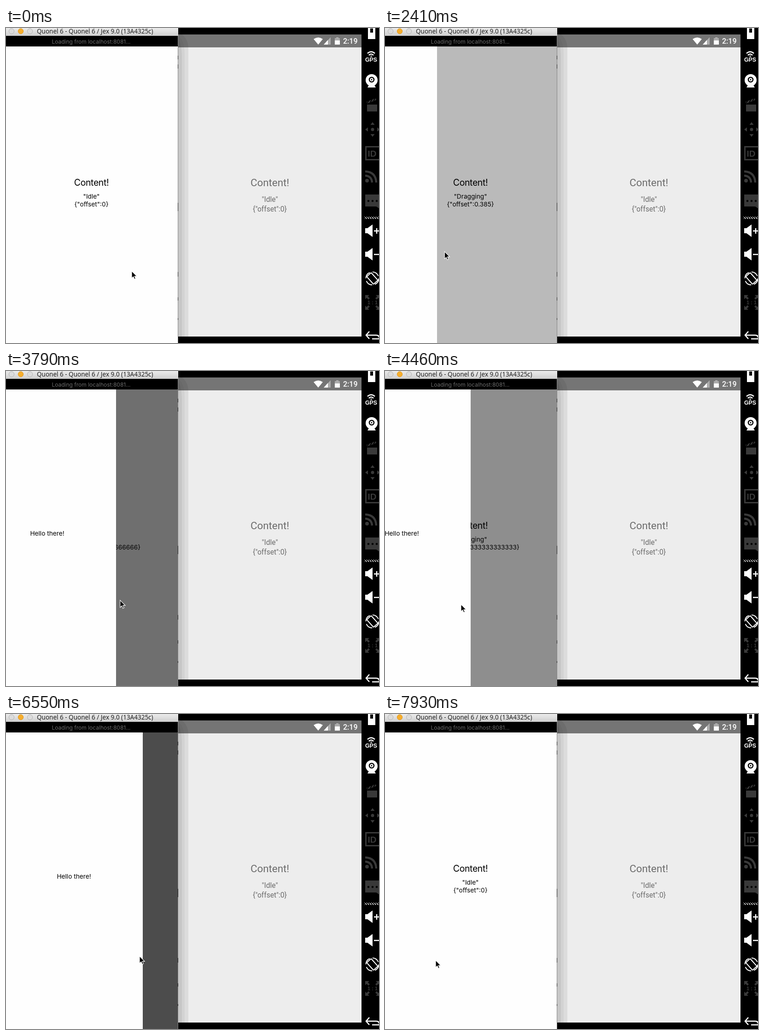
An HTML page for the animation above (7990 ms loop, 810 by 683 pixels).

```html
<!DOCTYPE html>
<html lang="en">
<head>
<meta charset="utf-8">
<title>Drawer layout</title>
<style>
  html, body { margin: 0; width: 100%; height: 100%; overflow: hidden; background: #000; }
  svg { display: block; width: 810px; height: 683px; }
  .mid { text-anchor: middle; }
  .phone { font: 13.7px Inter, sans-serif; }
  .phone .title { font-size: 19.5px; letter-spacing: -.02em; }
  .android { font: 15.6px Roboto, sans-serif; fill: #6c6c6c; }
  .android .title { font-size: 22.3px; }
  .bold { font-family: "Liberation Sans", sans-serif; font-weight: bold; }
  .line { fill: none; stroke: #fff; stroke-width: 2.5; }
  .dim { fill: #393939; }
  .dimline { fill: none; stroke: #393939; stroke-width: 3; }
</style>
</head>
<body>
<svg viewBox="0 0 810 683">
  <defs>
    <linearGradient id="bar" x2="0" y2="1">
      <stop stop-color="#ebebeb"/><stop offset="1" stop-color="#cfcfcf"/>
    </linearGradient>
    <pattern id="hatch" width="5" height="5" patternUnits="userSpaceOnUse">
      <path d="M0 0l4 5" stroke="#ddd" stroke-width="1.6"/>
    </pattern>
    <path id="speaker" d="M780-6h5l11-8v27l-11-8h-5z" fill="#fff"/>
    <path id="tip" d="M-4.5-10l4.500-6 4.500 6z"/>
    <path id="corner" d="M-16-16h9l-3 3 4 4-3 3-4-4-3 3z"/>
  </defs>
  <rect width="810" height="683"/>

  <!-- Right-hand device -->
  <rect x="374" y="14" width="398" height="655" fill="#ededed"/>
  <rect x="374" y="14" width="398" height="28" fill="#757575"/>
  <path d="M374 14h8q14 10 14 32v623h-22z" opacity=".07"/>
  <path d="M374 18q14 8 14 40v611h-14z" opacity=".04"/>
  <path d="M374 24q8 10 8 40v605h-8z" opacity=".06"/>
  <g fill="#fff">
    <path d="M668 24q10-7 20 0l-10 12z"/>
    <path d="M705 20v16h-15zM714 22h3v-2h5v2h3v6h-11z" opacity=".4"/>
    <path d="M699 26v10h-9zM714 27h11v9h-11z"/>
    <text x="732" y="34" font-family="Roboto, sans-serif" font-size="16" font-weight="500">2:19</text>
  </g>
  <g class="android mid">
    <text class="title" x="573" y="343">Content!</text>
    <text x="573" y="377">"Idle"</text>
    <text x="573" y="398">{"offset":0}</text>
  </g>

  <!-- Emulator toolbar -->
  <path d="M786 0h16v24h-16z" fill="#fff"/><path d="M791 1h6v9h-6z"/>
  <path class="line" d="M785 55q8-7 16 0M788 59q5-5 10 0"/>
  <circle cx="793" cy="61" r="1.5" fill="#fff"/>
  <text class="mid bold" x="793" y="73" fill="#fff" font-size="12.3">GPS</text>
  <circle cx="794" cy="113" r="13" fill="#fff"/>
  <circle cx="794" cy="112" r="5" fill="none" stroke="#000" stroke-width="2.5"/>
  <circle cx="794" cy="112" r="1.5"/>
  <path d="M788 124h12l3 5h-18z" fill="#fff"/>
  <g class="dim">
    <path d="M784 166h22v15h-22zM783 160l20-8 1 4-20 8z"/>
    <text class="mid bold" x="795" y="279" font-size="19">ID</text>
    <circle cx="784" cy="331" r="4"/>
    <path d="M780 361h30v30l-6-4h-24z"/>
    <text class="mid bold" x="796" y="599" font-size="11">1 : 1</text>
    <g transform="translate(796 220)">
      <circle r="3.5"/>
      <use href="#tip"/><use href="#tip" transform="rotate(90)"/>
      <use href="#tip" transform="rotate(180)"/><use href="#tip" transform="rotate(270)"/>
    </g>
    <g transform="translate(796 595)">
      <use href="#corner"/><use href="#corner" transform="rotate(90)"/>
      <use href="#corner" transform="rotate(180)"/><use href="#corner" transform="rotate(270)"/>
    </g>
  </g>
  <rect class="dimline" x="781.5" y="257.5" width="31" height="28"/>
  <path class="dimline" style="stroke-width:4.5" d="M780 320q14 1 15 15M780 311q23 1 24 24"/>
  <path d="M784 163l4-6M791 161l4-6M798 158l4-6" stroke="#000" stroke-width="2"/>
  <path d="M787 375h19" stroke="#000" stroke-width="4.500" stroke-linecap="round" stroke-dasharray="0 9"/>
  <rect x="778" y="409" width="32" height="5" fill="url(#hatch)"/>
  <use href="#speaker" y="440"/><use href="#speaker" y="491"/>
  <path class="line" d="M799 440h11M805 434v12M799 491h11"/>
  <g class="line" style="stroke-width:2">
    <rect x="789" y="532" width="13" height="22" rx="2" transform="rotate(-42 795.5 543)"/>
    <circle cx="795.5" cy="543" r="14" stroke-dasharray="16 6"/>
  </g>
  <path class="line" d="M789 658l-7 8 7 8M782 666h22q7 0 7 8h-16"/>

  <!-- Left-hand device -->
  <g class="phone">
    <rect id="page" y="40" width="373" height="643"/>
    <g class="mid">
      <text class="title" x="185.5" y="342">Content!</text>
      <text id="state" x="185.5" y="370"></text>
      <text id="offset" x="185.5" y="387"></text>
    </g>
    <g id="drawer">
      <rect x="-300" y="40" width="300" height="643" fill="#fefefe"/>
      <text class="mid" x="-149.5" y="356.5">Hello there!</text>
    </g>
  </g>
  <rect y="17" width="373" height="23"/>
  <text class="mid" x="185" y="33.5" fill="#6b6b6b" font-family="Inter, sans-serif" font-size="12">Loading from localhost:8081...</text>
  <rect width="374" height="17" fill="url(#bar)"/>
  <g fill="#dcdcdc" stroke="#b4b4b4">
    <circle cx="12" cy="7" r="5.7"/>
    <circle cx="32" cy="7" r="5.7" fill="#f6ae2d" stroke="#dc9a28"/>
    <circle cx="52" cy="7" r="5.7"/>
  </g>
  <text x="67" y="12" fill="#222" font-family="Noto Sans, sans-serif" font-size="13.5">Quonel 6 - Quonel 6 / Jex 9.0 (13A4325c)</text>
  <path d="M373.5 17v666" stroke="#858585"/>
  <path d="M373.5 60v8m0 11v9m0 291v18m0 132v10m0 45v7m0 38v4" stroke="#222"/>

  <path id="cursor" d="M0 0v15.500l3.600-3.300 2.400 5.400 2.500-1.100-2.400-5.200h5z" stroke="#fff" stroke-width="1.1"/>
</svg>
<script>
const LOOP = 7990, TICK = 10, DRAWER = 300, SCALE = 373 / 375;

// Smooth curve through [time, value] turning points, without overshoot.
function curve(...keys) {
  const slope = i => keys[i] && keys[i + 1]
    ? (keys[i + 1][1] - keys[i][1]) / (keys[i + 1][0] - keys[i][0]) : 0;
  const tangent = i => {
    const a = slope(i - 1), b = slope(i);
    return a * b > 0 ? 2 * a * b / (a + b) : 0;
  };
  return t => {
    const i = keys.findLastIndex(key => key[0] <= t);
    if (i < 0) return keys[0][1];
    if (i === keys.length - 1) return keys[i][1];
    const [t0, v0] = keys[i], [t1, v1] = keys[i + 1];
    const u = (t - t0) / (t1 - t0);
    return v0 + (v1 - v0) * u * u * (3 - 2 * u)
      + (t1 - t0) * u * (1 - u) * (tangent(i) * (1 - u) - tangent(i + 1) * u);
  };
}

const pointerX = curve([230, 273], [930, 8], [1290, 8], [1630, 73], [2580, 132], [2970, 132],
  [3230, 142], [3900, 255], [4460, 165], [5380, 14], [5650, 199], [5910, 290], [6730, 290],
  [7280, 138], [7930, 110]);
const pointerY = curve([230, 527], [930, 476], [1630, 480], [3230, 491], [4460, 506],
  [5650, 524], [7280, 526], [7930, 534]);
const pull = curve([1290, 0], [1630, 47.5], [2580, 119], [2970, 119], [3230, 127.5], [3900, 250],
  [4460, 188.5], [4650, 0], [5400, 0], [5650, 136.5], [5910, 300], [7100, 300],
  [7280, 226.5], [7480, 0]);

const $ = id => document.getElementById(id);
const move = (id, x, y) => $(id).setAttribute('transform', `translate(${x} ${y})`);

function draw(now) {
  const t = Math.floor(now % LOOP / TICK) * TICK;
  const points = Math.round(pull(t) * 2) / 2;
  const open = points / DRAWER;
  const released = Math.abs(pull(t) - pull(t - TICK)) / TICK > 0.9;
  const state = open === 0 || open === 1 ? 'Idle' : released ? 'Settling' : 'Dragging';
  const shade = 254 * (1 - 0.7 * open);

  $('page').setAttribute('fill', `rgb(${shade},${shade},${shade})`);
  $('state').textContent = JSON.stringify(state);
  $('offset').textContent = JSON.stringify({ offset: open });
  move('drawer', Math.floor(points * SCALE - 1), 0);
  move('cursor', pointerX(t), pointerY(t));
  requestAnimationFrame(draw);
}
requestAnimationFrame(draw);
</script>
</body>
</html>
```
